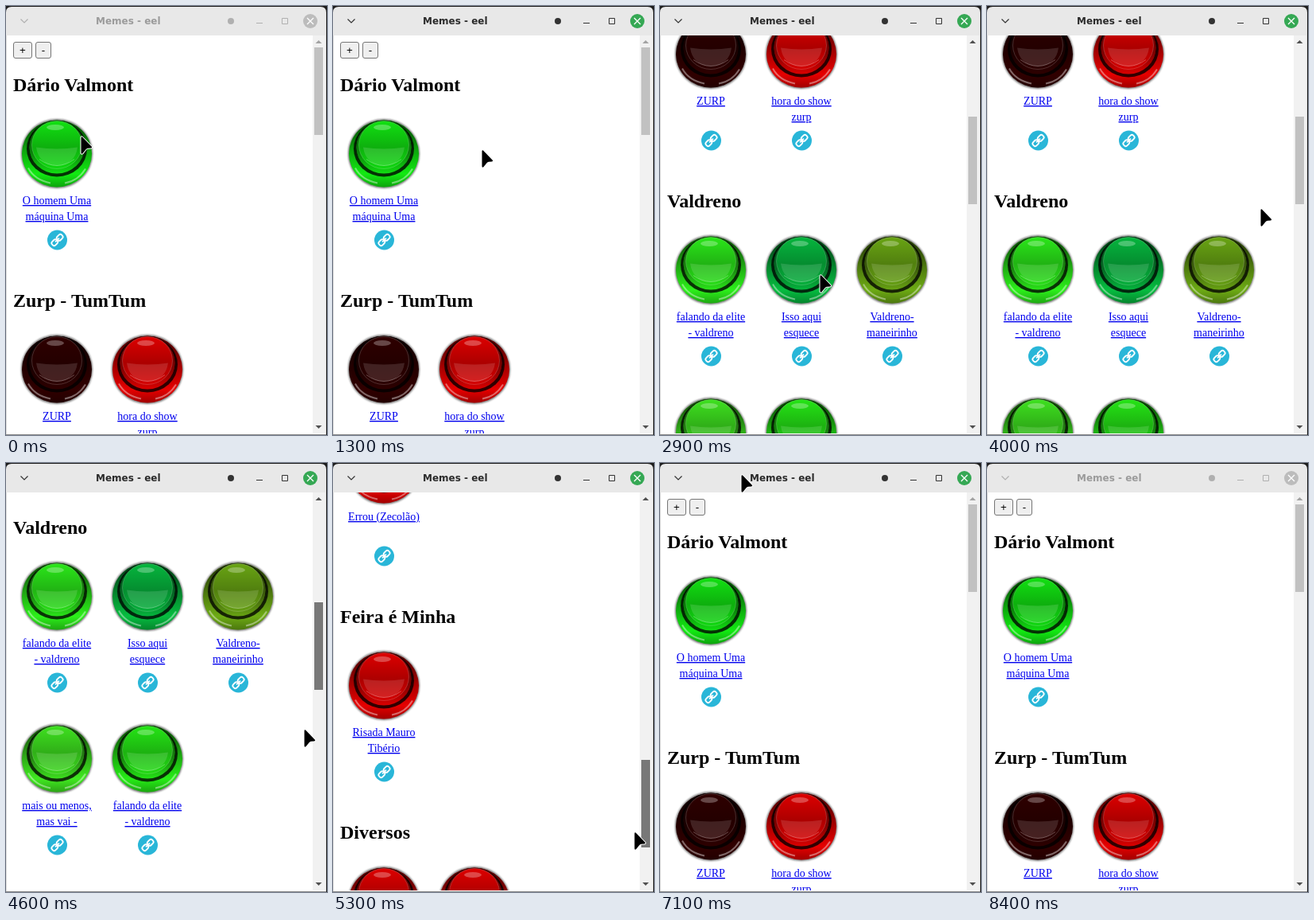
These frames come from a looping animation (404x539 px, 8.5 s). An HTML page:

```html
<!DOCTYPE html>
<html lang="pt">
<head>
<meta charset="utf-8">
<title>Memes - eel</title>
<style>
html, body { margin: 0; width: 100%; height: 100%; overflow: hidden; background: #1c1c1c; }
svg { display: block; width: 404px; height: 539px; }
.title { font: bold 12px "DejaVu Sans", sans-serif; }
.head { font: bold 24px "Liberation Serif", serif; }
.label { font: 14px "Liberation Serif", serif; fill: #00e; text-decoration: underline; text-anchor: middle; }
.key { font: 13.33px "Liberation Sans", sans-serif; text-anchor: middle; }
#bar { color: #333; }
#bar.idle { color: #b0b0b0; }
#bar .title { fill: #2b2b2b; }
#bar.idle .title { fill: #9b9b9b; }
#close { fill: #35a854; }
.idle #close { fill: #bcbcbc; }
.pressed .dome { transform: translate(0, 4px) scale(.96); filter: brightness(.82); }
</style>
</head>
<body>
<svg viewBox="0 0 404 539">
  <defs>
    <clipPath id="view"><rect x="1" y="37" width="385" height="500"/></clipPath>
    <filter id="soft" x="-20%" y="-20%" width="140%" height="140%"><feGaussianBlur stdDeviation="1"/></filter>
    <linearGradient id="baseShade" x2="0" y2="1">
      <stop offset="0" stop-opacity=".75"/><stop offset=".45" stop-opacity=".3"/>
      <stop offset=".8" stop-opacity="0"/><stop offset="1" stop-opacity=".3"/>
    </linearGradient>
    <linearGradient id="rimShade" x2="0" y2="1">
      <stop offset="0" stop-opacity=".6"/><stop offset=".6" stop-opacity=".45"/><stop offset="1" stop-opacity=".05"/>
    </linearGradient>
    <linearGradient id="domeShade" x2="0" y2="1">
      <stop offset="0" stop-opacity=".04"/><stop offset=".55" stop-opacity=".25"/><stop offset="1" stop-opacity=".08"/>
    </linearGradient>
    <g id="base">
      <ellipse rx="45" ry="43.5" fill="#444" opacity=".75" filter="url(#soft)"/>
      <ellipse rx="44" ry="42" fill="currentColor"/>
      <ellipse rx="44" ry="42" fill="url(#baseShade)"/>
      <path d="M-36 18Q-28 33 -8 37M10 37Q27 34 36 19" fill="none" stroke="#fff" stroke-opacity=".4" stroke-width="2"/>
      <ellipse cy="-6" rx="38" ry="35" fill="#000" opacity=".78"/>
      <ellipse cy="-8" rx="34.5" ry="33" fill="currentColor"/>
      <ellipse cy="-8" rx="34.5" ry="33" fill="url(#rimShade)"/>
    </g>
    <g id="dome">
      <ellipse cy="-11" rx="31.5" ry="30" fill="currentColor"/>
      <ellipse cy="-11" rx="31.5" ry="30" fill="url(#domeShade)" stroke="#fff" stroke-opacity=".18"/>
      <path d="M-26 -8Q0 -4 26 -8Q23 14 0 15Q-23 14 -26 -8Z" fill="#fff" opacity=".13"/>
      <ellipse cx="-2" cy="-33" rx="11" ry="3.5" fill="#fff" opacity=".28"/>
      <path d="M-22 7Q0 23 22 7" fill="none" stroke="#fff" stroke-opacity=".3"/>
    </g>
    <g id="link">
      <circle r="12.5" fill="#29b6d8"/>
      <g transform="rotate(-45)" fill="none" stroke="#fff" stroke-width="1.8">
        <rect x="-8.5" y="-3" width="8" height="6" rx="2.5"/>
        <rect x=".5" y="-3" width="8" height="6" rx="2.5"/>
        <path d="M-3.5 0H3.5"/>
      </g>
    </g>
  </defs>

  <path d="M0 539V8Q0 1 7 1H396Q403 1 403 8V539Z" fill="#e8e8e8"/>
  <rect x="1" y="37" width="401" height="501" fill="#fff"/>
  <path d="M0 538.5H403" stroke="#8e8e8e"/>
  <path d="M.5 37V538" stroke="#dcdcdc"/>

  <g id="bar" fill="none" stroke="currentColor">
    <path d="M18.5 16.5L23 21L27.5 16.5" stroke-width="1.2"/>
    <text class="title" x="113" y="23" stroke="none">Memes - eel</text>
    <circle cx="283" cy="19" r="4" fill="currentColor" stroke="none"/>
    <path d="M315 21.5H323M347.5 15.5H354.5V22.5H347.5Z"/>
    <circle id="close" cx="383" cy="19" r="9" stroke="none"/>
    <path d="M379 15L387 23M387 15L379 23" stroke="#fff" stroke-width="1.3"/>
  </g>

  <g clip-path="url(#view)"><g id="page"></g></g>

  <rect x="386" y="37" width="16" height="500" fill="#f1f1f1"/>
  <path id="up" d="M389.5 47L393.5 43L397.5 47Z"/>
  <path d="M389.5 527L393.5 531L397.5 527Z" fill="#505050"/>
  <rect id="thumb" x="388" width="11" height="110"/>

  <path id="cursor" d="M1.5 2.5V21.5Q1.8 23.5 3.4 22.3L7.5 17.2Q8.5 16 10 15.8L14 15.4Q16 15 14.6 13.6L3 1.6Q1.6 .6 1.5 2.5Z"
    stroke="#fff" stroke-width="2" paint-order="stroke" stroke-linejoin="round"/>
</svg>
<script>
const $ = id => document.getElementById(id);
const LOOP = 8500, STEP = 100, RED = '#e60000';

// title, then [colour, first line, second line] for each button
const sections = [
  ['Dário Valmont', ['#12ea12', 'O homem Uma', 'máquina Uma']],
  ['Zurp - TumTum', ['#300000', 'ZURP', ''], [RED, 'hora do show', 'zurp']],
  ['Valdreno',
    ['#2cf01a', 'falando da elite', '- valdreno'], ['#06bd40', 'Isso aqui', 'esquece'],
    ['#6dab14', 'Valdreno-', 'maneirinho'], ['#40ea20', 'mais ou menos,', 'mas vai -'],
    ['#26ee16', 'falando da elite', '- valdreno']],
  ['Nelmar Rocio', [RED, 'Olha o gol', '']],
  ['Zecolão', [RED, 'Errou (Zecolão)', '']],
  ['Feira é Minha', [RED, 'Risada Mauro', 'Tibério']],
  ['Diversos', [RED, 'Risada fina', ''], [RED, 'Tambor', '']]
];

const text = (cls, x, y, s) => `<text class="${cls}" x="${x}" y="${y}">${s}</text>`;
const key = (x, w, s) => `<rect x="${x + .5}" y="45.5" width="${w - 1}" height="20" rx="2.5"
  fill="#efefef" stroke="#767676"/>` + text('key', x + w / 2, 60, s);

function item([color, first, second], i, headY) {
  const x = 64 + i % 3 * 114, y = headY + Math.floor(i / 3) * 204;
  return `<g class="push" transform="translate(${x} ${y + 86.5})" color="${color}">
    <use href="#base"/><use class="dome" href="#dome"/></g>` +
    text('label', x, y + 150, first) + text('label', x, y + 170, second) +
    `<use href="#link" x="${x + .5}" y="${y + 195}"/>`;
}

function buildPage() {
  let headY = 99, markup = key(9, 24, '+') + key(37, 20, '-');
  for (const [title, ...items] of sections) {
    markup += text('head', 9, headY + 8, title) + items.map((it, i) => item(it, i, headY)).join('');
    headY += 67 + 204 * Math.ceil(items.length / 3);
  }
  $('page').innerHTML = markup;
}
buildPage();
const pushes = document.querySelectorAll('.push');

// each move: start, end, goal
const scrollMoves = [[1900, 2450, 396], [4330, 5450, 1520], [5620, 6300, 0]];
const cursorMoves = [
  [0, 200, 54, 193],                                // press the first button
  [1000, 1700, 389, 160], [1900, 2450, 383, 248],   // drag the bar
  [2500, 2700, 208, 334], [2800, 3100, 178, 347],   // press another button
  [3600, 3700, 215, 284], [3800, 4100, 388, 244],   // back to the bar
  [4100, 4600, 374, 334], [4600, 5300, 378, 463], [5600, 6130, 340, 75],
  [6500, 7000, 58, 3], [7000, 7400, 330, 72],       // wander off the window
  [7400, 7800, 184, 11], [7800, 7900, 100, -60], [8000, 8100, 18, -21], [8100, 8200, 18, -24]
];

const ease = f => f * f * (3 - 2 * f);
function follow(start, moves, t) {
  return moves.reduce((pos, [from, to, ...goal]) => {
    const f = ease(Math.min(1, Math.max(0, (t - from) / (to - from))));
    return pos.map((v, i) => v + (goal[i] - v) * f);
  }, start).map(Math.round);
}
const within = (t, from, to) => t >= from && t < to;

function draw(now) {
  const t = Math.floor(now % LOOP / STEP) * STEP;
  const [scroll] = follow([0], scrollMoves, t);
  const [x, y] = follow([93, 163], cursorMoves, t);
  const drag = within(t, 1900, 2600) || within(t, 4300, 6600);
  const hover = within(t, 1700, 1900) || within(t, 4100, 4300);
  $('bar').setAttribute('class', within(t, 600, 8400) ? '' : 'idle');
  $('page').setAttribute('transform', `translate(0 ${-scroll})`);
  $('thumb').setAttribute('y', Math.round(52 + scroll / 4.56));
  $('thumb').setAttribute('fill', drag ? '#787878' : hover ? '#a8a8a8' : '#c1c1c1');
  $('up').setAttribute('fill', scroll ? '#505050' : '#a3a3a3');
  $('cursor').setAttribute('transform', `translate(${x} ${y})`);
  pushes[0].classList.toggle('pressed', within(t, 600, 900));
  pushes[4].classList.toggle('pressed', within(t, 3300, 3600));
  requestAnimationFrame(draw);
}
draw(performance.now());
</script>
</body>
</html>
```
